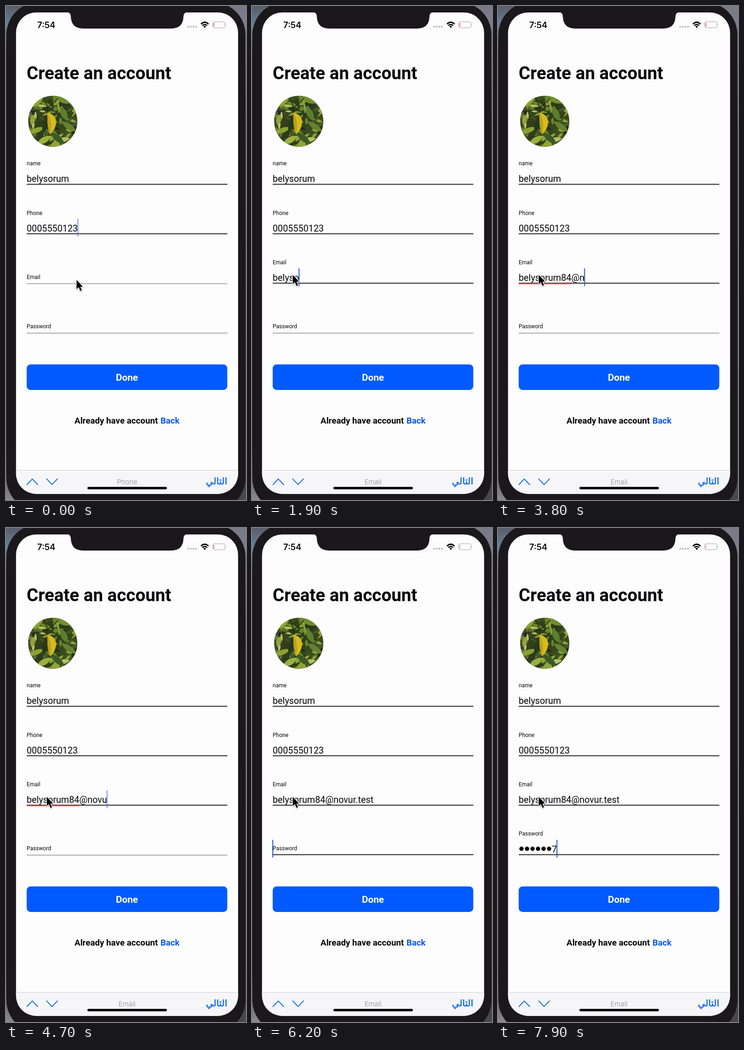
An HTML page for the animation above (8000 ms loop, 522x1073 px).

```html
<!DOCTYPE html>
<html lang="en">
<head>
<meta charset="utf-8">
<title>Create an account</title>
<style>
  html, body { margin: 0; width: 100%; height: 100%; overflow: hidden; background: #1a181b; }
  svg { display: block; width: 100vw; height: 100vh; }
  text { font-family: Roboto, "Open Sans", sans-serif; fill: #050507; white-space: pre; }
  .label { font-size: 12px; }
  .value { font-size: 19.8px; }
  .bold { font-weight: 700; }
  .system { font-family: Inter, Roboto, sans-serif; }
  .mid { text-anchor: middle; }
  .next { font: 20px "DejaVu Sans", sans-serif; fill: #1169e6; stroke: #1169e6; stroke-width: .6; }
</style>
</head>
<body>
<svg viewBox="0 0 522 1073" preserveAspectRatio="none">
  <defs>
    <linearGradient id="deskLeft" x1="0" y1="0" x2="0" y2="1">
      <stop offset="0" stop-color="#5a5d68"/>
      <stop offset=".04" stop-color="#64819c"/>
      <stop offset=".09" stop-color="#3a3a41"/>
      <stop offset=".9" stop-color="#39383b"/>
      <stop offset="1" stop-color="#8a898c"/>
    </linearGradient>
    <linearGradient id="deskRight" x1="0" y1="0" x2="0" y2="1">
      <stop offset="0" stop-color="#777985"/>
      <stop offset=".1" stop-color="#85879a"/>
      <stop offset=".25" stop-color="#55565f"/>
      <stop offset="1" stop-color="#48474b"/>
    </linearGradient>
    <linearGradient id="foliage" x1="0" y1="0" x2="1" y2="1">
      <stop offset="0" stop-color="#4f6124"/>
      <stop offset=".45" stop-color="#2c381a"/>
      <stop offset="1" stop-color="#4b6324"/>
    </linearGradient>
    <clipPath id="avatar"><ellipse cx="101.7" cy="250.3" rx="53.4" ry="55.4"/></clipPath>
  </defs>

  <rect width="261" height="1073" fill="url(#deskLeft)"/>
  <rect x="261" width="261" height="1073" fill="url(#deskRight)"/>
  <rect x="1" y="-8" width="519.8" height="1104" rx="70" fill="#1a181b"/>
  <rect x="21.8" y="14" width="483" height="1045.7" rx="44" fill="#fefdfe"/>
  <path d="M21.8 1008H504.8V1015.7A44 44 0 0 1 460.8 1059.7H65.8A44 44 0 0 1 21.8 1015.7Z" fill="#f6f6f8"/>
  <path d="M22 1008.5H504.8" stroke="#d0d0d3"/>
  <path d="M132 13Q141 14 141 23Q142 49 168 49H359Q385 49 386 23Q386 14 395 13Z" fill="#1a181b"/>

  <text class="system" x="68" y="47.5" font-size="18.4" font-weight="600">7:54</text>
  <g fill="#c3c3c6">
    <circle cx="396.4" cy="45" r="2.2"/><circle cx="402" cy="45" r="2.2"/>
    <circle cx="407.6" cy="45" r="2.2"/><circle cx="413.2" cy="45" r="2.2"/>
  </g>
  <g fill="none" stroke="#000" stroke-width="2.7">
    <path d="M424 39.2Q432.2 31.2 440.4 39.2"/>
    <path d="M427 42.6Q432.2 37.8 437.4 42.6"/>
  </g>
  <path d="M429.2 44.6Q432.2 42 435.2 44.6L432.2 47.8Z"/>
  <rect x="449.5" y="34.2" width="27" height="13" rx="3.8" fill="none" stroke="#a2a0a3" stroke-width="1.1"/>
  <path d="M478.2 38.8Q480 40.7 478.2 42.6Z" fill="#a2a0a3"/>
  <rect id="charge" x="451.3" y="36.5" width="1.7" height="8.4" rx=".8"/>

  <text class="bold" x="45" y="159" font-size="38.5">Create an account</text>
  <g id="photo" clip-path="url(#avatar)">
    <rect x="48" y="194" width="108" height="113" fill="url(#foliage)"/>
  </g>
  <g id="form"></g>

  <rect x="45" y="778.5" width="436.3" height="55.6" rx="8.5" fill="#005aff"/>
  <text class="bold mid" x="263" y="814.3" font-size="20.8" style="fill:#fff">Done</text>
  <text class="bold" x="149" y="907" font-size="18.75">Already have account</text>
  <text class="bold" x="336" y="907" font-size="18.6" style="fill:#0a59e6">Back</text>

  <g fill="none" stroke="#1169e6" stroke-width="1.9">
    <path d="M45 1040L57.2 1027.3L69.4 1040"/>
    <path d="M88 1026.7L100.2 1039.4L112.4 1026.7"/>
  </g>
  <text id="hint" class="system mid" x="263.3" y="1039.3" font-size="14.8" style="fill:#a3a3a6"></text>
  <text class="mid next" x="458" y="1039">التالي</text>
  <rect x="177" y="1044.4" width="173" height="5.4" rx="2.7"/>

  <path id="typo" stroke="#e5352c" stroke-width="2.4" stroke-dasharray="2.4 1.3"/>
  <rect id="caret" width="2.2" height="38.5" fill="#3465cb"/>
  <g id="pointer">
    <path d="M0 0V20L4.6 15.8L8.1 24L11.4 22.6L8.1 14.7H13.8Z"
      stroke="#fff" stroke-width="2.6" stroke-linejoin="round" paint-order="stroke"
      style="filter:drop-shadow(0 1px 1px #0005)"/>
  </g>
</svg>
<script>
const LOOP = 8000, LEFT = 45, DOT = 12;
const EMAIL_FOCUS = 600, PASS_FOCUS = 6200;
const user = "belysorum", email = user + "84@novur.test";
const $ = id => document.getElementById(id);

function add(parent, tag, attrs, text = "") {
  const el = document.createElementNS("http://www.w3.org/2000/svg", tag);
  for (const k in attrs) el.setAttribute(k, attrs[k]);
  el.textContent = text;
  parent.append(el);
  return el;
}

let seed = 11;
const random = () => (seed = seed * 16807 % 2147483647) / 2147483647;

function leaf(x, y, len, w, angle, fill) {
  add($("photo"), "path", {
    d: `M${-len / 2} 0Q0 ${-w} ${len / 2} 0Q0 ${w} ${-len / 2} 0Z`,
    transform: `translate(${x} ${y}) rotate(${angle})`, fill
  });
}

function drawPhoto() {
  leaf(57, 240, 30, 26, 80, "#4b4a49");
  leaf(63, 283, 34, 22, 20, "#504d42");
  const greens = ["#1f2b14", "#2d3e1a", "#45592a", "#6a832c", "#8fa43a", "#b3c163"];
  for (let i = 0; i < 90; i++)
    leaf(48 + random() * 108, 194 + random() * 113, 12 + random() * 20,
      4 + random() * 9, random() * 180, greens[Math.floor(random() * greens.length)]);
  leaf(66, 209, 36, 13, -35, "#8ea52f");
  leaf(124, 204, 40, 13, 20, "#6f8f2c");
  leaf(126, 234, 34, 14, 65, "#5c7f2c");
  leaf(137, 262, 40, 12, 35, "#648330");
  leaf(66, 270, 38, 11, -20, "#8ba232");
  leaf(83, 291, 36, 13, -30, "#9cb040");
  leaf(112, 287, 40, 13, 40, "#3c5924");
  const part = (d, fill) => add($("photo"), "path", { d, fill });
  add($("photo"), "path", { d: "M77 194Q92 212 91 234M54 229Q91 229 113 200", fill: "none", stroke: "#1f2817", "stroke-width": 1.8 });
  part("M91 236Q72 262 82 274Q92 267 91 236Z", "#27381a");
  part("M90 232Q109 235 109 254Q107 270 96 278Q89 265 90 232Z", "#d8ba1b");
  part("M90 232Q102 252 96 278Q89 263 90 232Z", "#bca21a");
}

function field(name, base, value) {
  const form = $("form");
  return {
    base,
    label: add(form, "text", { class: "label", x: LEFT }, name),
    value: add(form, "text", { class: "value", x: LEFT, y: base - 5 }, value),
    line: add(form, "rect", { x: LEFT, width: 436.5 })
  };
}
const [nameField, phoneField, mailField, passField] = [
  field("name", 387.3, user), field("Phone", 494.7, "0005550123"),
  field("Email", 602.1, ""), field("Password", 709.5, "")
];
const dots = Array.from({ length: 6 }, (_, i) =>
  add($("form"), "circle", { cx: LEFT + 6.1 + i * DOT, cy: 696.8, r: 4.7 }));

// [time, characters shown]
const mailKeys = [
  [600, 0], [1100, 1], [1200, 2], [1300, 3], [1500, 4], [1700, 5], [1900, 6],
  [2000, 7], [2200, 8], [2300, 9], [3000, 10], [3200, 11], [3500, 12],
  [3800, 13], [4000, 14], [4100, 15], [4200, 16], [4800, 17], [4900, 18],
  [5000, 19], [5200, 20], [5300, 21], [5400, 22], [5800, 22]
];
// [time, dots, visible digit]
const passKeys = [
  [6200, 0, ""], [6700, 0, "1"], [6800, 1, "2"], [6900, 2, "3"], [7100, 3, ""],
  [7300, 3, "4"], [7400, 4, "5"], [7600, 5, "6"], [7800, 6, "7"]
];

const clamp = v => Math.max(0, Math.min(1, v));
const ease = v => v * v * (3 - 2 * v);
const last = (keys, t) => keys.findLast(k => k[0] <= t);

function float(f, amount) {
  const focused = amount > 0;
  f.label.setAttribute("y", f.base - 9.5 - 31.6 * ease(amount));
  f.line.setAttribute("y", focused ? f.base - 1.2 : f.base + .5);
  f.line.setAttribute("height", focused ? 2.4 : 1);
  f.line.setAttribute("fill", focused ? "#454447" : "#5f5e61");
}

function blink(age) {
  const a = age % 1000;
  return a < 800 ? 1 - clamp((a - 440) / 160) : clamp((a - 800) / 160);
}

function draw(t) {
  const mail = last(mailKeys, t), pass = last(passKeys, t);
  mailField.value.textContent = email.slice(0, mail ? mail[1] : 0);
  passField.value.textContent = pass ? pass[2] : "";
  const masked = pass ? pass[1] : 0;
  passField.value.setAttribute("x", LEFT + masked * DOT);
  dots.forEach((d, i) => d.setAttribute("visibility", i < masked ? "visible" : "hidden"));

  float(mailField, clamp((t - EMAIL_FOCUS) / 300));
  float(passField, clamp((t - PASS_FOCUS) / 300));
  $("hint").textContent = t < EMAIL_FOCUS ? "Phone" : "Email";
  $("charge").setAttribute("fill", t < 5800 ? "#e9635a" : "#eba58d");

  const active = pass ? passField : mail ? mailField : phoneField;
  const since = pass ? pass[0] : mail ? mail[0] : -500;
  const text = active.value;
  const width = text.textContent ? text.getComputedTextLength() : 0;
  $("caret").setAttribute("x", +text.getAttribute("x") + width - 1);
  $("caret").setAttribute("y", active.base - 32.3);
  $("caret").setAttribute("opacity", blink(t - since));

  const typo = t >= 3500 && t < PASS_FOCUS;
  $("typo").setAttribute("d", typo
    ? `M${LEFT} 603.2H${LEFT + mailField.value.getSubStringLength(0, user.length + 2)}` : "");

  const p = ease(clamp((t - 50) / 500));
  $("pointer").setAttribute("transform", `translate(${153.5 - 64.8 * p} ${595 - 11 * p})`);
}

drawPhoto();
float(nameField, 1);
float(phoneField, 1);
const start = performance.now();
function tick() {
  draw((performance.now() - start) % LOOP);
  requestAnimationFrame(tick);
}
tick();
</script>
</body>
</html>
```
